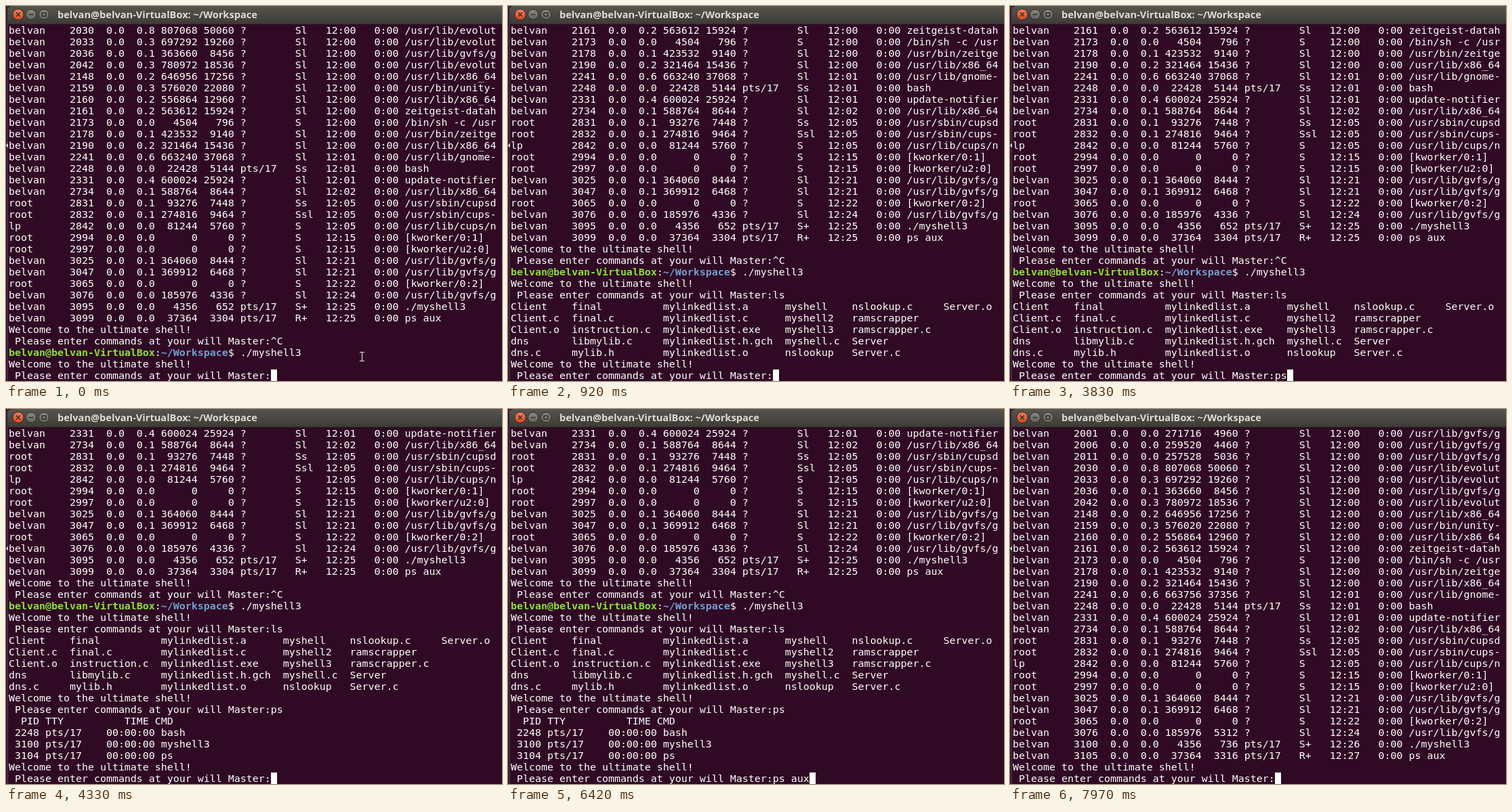
Write an HTML page that moves like this. It is 732 px wide and 554 px high and loops after 8 s.

```html
<!DOCTYPE html>
<html lang="en">
<head>
<meta charset="utf-8">
<title>Terminal</title>
<style>
html, body { margin: 0; width: 100%; height: 100%; overflow: hidden; background: #300a24; }
svg { display: block; width: 732px; height: 554px; }
.row { font: 14.95px "DejaVu Sans Mono", monospace; font-kerning: none; font-variant-ligatures: none; white-space: pre; fill: #fff; }
.host { font-weight: bold; fill: #8ae234; }
.path { font-weight: bold; fill: #729fcf; }
.title { font: bold 14.6px "Open Sans", sans-serif; fill: #dfdbd2; }
</style>
</head>
<body>
<svg viewBox="0 0 732 554">
  <defs>
    <linearGradient id="bar" x2="0" y2="1"><stop stop-color="#56554e"/><stop offset="1" stop-color="#3c3b37"/></linearGradient>
    <linearGradient id="red" x2="0" y2="1"><stop stop-color="#f37f5a"/><stop offset="1" stop-color="#e2481c"/></linearGradient>
    <linearGradient id="grey" x2="0" y2="1"><stop stop-color="#8b8a82"/><stop offset="1" stop-color="#65645d"/></linearGradient>
  </defs>
  <rect width="732" height="554" fill="#300a24"/>
  <rect width="2" height="554" fill="#381530"/>
  <rect x="2" width="1" height="554" fill="#4c3a46"/>
  <path d="M2 27V7Q2 0 9 0H732V27Z" fill="url(#bar)"/>
  <rect x="2" y="26" width="730" height="1" fill="#35302f"/>
  <path d="M0 206L3 202.5V209.5Z" fill="#ddd"/>
  <g stroke="#2f2e2a">
    <circle cx="18" cy="12.5" r="8" fill="url(#red)"/>
    <circle cx="37" cy="12.5" r="7.5" fill="url(#grey)"/>
    <circle cx="56" cy="12.5" r="7.5" fill="url(#grey)"/>
    <path d="M15 9.5l6 6m0-6l-6 6M33.5 12.5h7M53 10h6v5h-6z" fill="none" stroke-width="1.5"/>
  </g>
  <text class="title" id="title" x="76" y="18"></text>
  <g id="screen"></g>
  <rect id="cursor" y="537" width="9" height="17" fill="#fff"/>
  <path id="pointer" d="M522 511.5h3l.5 1 .5-1h3M525.5 512v12M522 524.5h3l.5-1 .5 1h3" fill="none" stroke="#fff"/>
</svg>
<script>
const ROWS = 31, CHAR = 9, LINE = 17, LEFT = 4, LOOP = 8000;
const user = 'belvan', host = `${user}@${user}-VirtualBox`, dir = '~/Workspace';
const $ = id => document.getElementById(id);

// user (u, r or l), pid, mem, vsz, rss, tty, stat, start, command
const processes = `u 2030 0.8 807068 50060 ? Sl 12:00 /usr/lib/evolut
u 2033 0.3 697292 19260 ? Sl 12:00 /usr/lib/evolut
u 2036 0.1 363660 8456 ? Sl 12:00 /usr/lib/gvfs/g
u 2042 0.3 780972 18536 ? Sl 12:00 /usr/lib/evolut
u 2148 0.2 646956 17256 ? Sl 12:00 /usr/lib/x86_64
u 2159 0.3 576020 22080 ? Sl 12:00 /usr/bin/unity-
u 2160 0.2 556864 12960 ? Sl 12:00 /usr/lib/x86_64
u 2161 0.2 563612 15924 ? Sl 12:00 zeitgeist-datah
u 2173 0.0 4504 796 ? S 12:00 /bin/sh -c /usr
u 2178 0.1 423532 9140 ? Sl 12:00 /usr/bin/zeitge
u 2190 0.2 321464 15436 ? Sl 12:00 /usr/lib/x86_64
u 2241 0.6 663240 37068 ? Sl 12:01 /usr/lib/gnome-
u 2248 0.0 22428 5144 pts/17 Ss 12:01 bash
u 2331 0.4 600024 25924 ? Sl 12:01 update-notifier
u 2734 0.1 588764 8644 ? Sl 12:02 /usr/lib/x86_64
r 2831 0.1 93276 7448 ? Ss 12:05 /usr/sbin/cupsd
r 2832 0.1 274816 9464 ? Ssl 12:05 /usr/sbin/cups-
l 2842 0.0 81244 5760 ? S 12:05 /usr/lib/cups/n
r 2994 0.0 0 0 ? S 12:15 [kworker/0:1]
r 2997 0.0 0 0 ? S 12:15 [kworker/u2:0]
u 3025 0.1 364060 8444 ? Sl 12:21 /usr/lib/gvfs/g
u 3047 0.1 369912 6468 ? Sl 12:21 /usr/lib/gvfs/g
r 3065 0.0 0 0 ? S 12:22 [kworker/0:2]
u 3076 0.0 185976 4336 ? Sl 12:24 /usr/lib/gvfs/g`.split('\n');

const before = [...processes,
  'u 3095 0.0 4356 652 pts/17 S+ 12:25 ./myshell3',
  'u 3099 0.0 37364 3304 pts/17 R+ 12:25 ps aux'];
const after = [
  'u 2001 0.0 271716 4960 ? Sl 12:00 /usr/lib/gvfs/g',
  'u 2006 0.0 259520 4460 ? Sl 12:00 /usr/lib/gvfs/g',
  'u 2011 0.0 257528 5036 ? Sl 12:00 /usr/lib/gvfs/g',
  ...processes.map(p => p.replace('663240 37068', '663756 37356').replace('185976 4336', '185976 5312')),
  'u 3100 0.0 4356 736 pts/17 S+ 12:26 ./myshell3',
  'u 3105 0.0 37364 3316 pts/17 R+ 12:27 ps aux'];

const owners = { u: user, r: 'root', l: 'lp' };
function psRow(line) {
  const [owner, pid, mem, vsz, rss, tty, stat, start, ...cmd] = line.split(' ');
  return owners[owner].padEnd(9) + pid.padStart(5) + '  0.0' + mem.padStart(5) + vsz.padStart(7) +
    rss.padStart(6) + ' ' + tty.padEnd(9) + stat.padEnd(5) + start + '   0:00 ' + cmd.join(' ');
}

const lsWidths = [10, 15, 20, 11, 15, 0];
const files = `Client final mylinkedlist.a myshell nslookup.c Server.o
Client.c final.c mylinkedlist.c myshell2 ramscrapper
Client.o instruction.c mylinkedlist.exe myshell3 ramscrapper.c
dns libmylib.c mylinkedlist.h.gch myshell.c Server
dns.c mylib.h mylinkedlist.o nslookup Server.c`.split('\n')
  .map(line => line.split(' ').map((name, i) => name.padEnd(lsWidths[i])).join(''));

const jobs = ['  PID TTY          TIME CMD',
  ...['2248 bash', '3100 myshell3', '3104 ps'].map(job => {
    const [pid, cmd] = job.split(' ');
    return ` ${pid} pts/17    00:00:00 ${cmd}`;
  })];

const welcome = 'Welcome to the ultimate shell!';
const ask = ' Please enter commands at your will Master:';
const prompt = `<tspan class="host">${host}</tspan>:<tspan class="path">${dir}</tspan>$ ./myshell3`;

// Scrollback at each stage, without the live input line.
const logs = [[...before.map(psRow), welcome, ask + '^C', prompt, welcome]];
function run(command, output) {
  logs.push([...logs[logs.length - 1], ask + command, ...output, welcome]);
}
run('ls', files);
run('ps', jobs);
run('ps aux', after.map(psRow));

// [time, stage, typed text, cursor visible]
const steps = [
  [0, 0, '', 1], [500, 0, '', 1], [550, 0, 'l', 1], [610, 0, 'ls', 1],
  [920, 1, '', 1], [1480, 1, '', 0], [2070, 1, '', 1], [2690, 1, '', 0], [3290, 1, '', 1],
  [3740, 1, 'p', 1], [3830, 1, 'ps', 1],
  [4330, 2, '', 1], [4930, 2, '', 0], [5290, 2, 'p', 1], [5400, 2, 'ps', 1], [5500, 2, 'ps ', 1],
  [5650, 2, 'ps a', 1], [5770, 2, 'ps au', 1], [6360, 2, 'ps au', 0], [6390, 2, 'ps aux', 0], [6420, 2, 'ps aux', 1],
  [6820, 3, '', 1], [7380, 3, '', 0], [7970, 3, '', 1]
];

$('title').textContent = `${host}: ${dir}`;
const rows = Array.from({ length: ROWS }, (_, i) => {
  const row = document.createElementNS('http://www.w3.org/2000/svg', 'text');
  row.setAttribute('class', 'row');
  row.setAttribute('x', LEFT);
  row.setAttribute('y', 41 + i * LINE);
  return $('screen').appendChild(row);
});

let shown = null;
function draw(t) {
  const step = steps.findLast(s => s[0] <= t);
  if (step === shown) return;
  shown = step;
  const [time, stage, typed, blink] = step;
  const input = ask + typed;
  const lines = [...logs[stage], input].slice(-ROWS);
  rows.forEach((row, i) => { row.innerHTML = lines[i]; });
  $('cursor').setAttribute('x', LEFT + input.length * CHAR);
  $('cursor').setAttribute('visibility', blink ? 'visible' : 'hidden');
  $('pointer').setAttribute('visibility', time < 500 ? 'visible' : 'hidden');
}

function tick() {
  draw(performance.now() % LOOP);
  requestAnimationFrame(tick);
}
tick();
</script>
</body>
</html>
```
